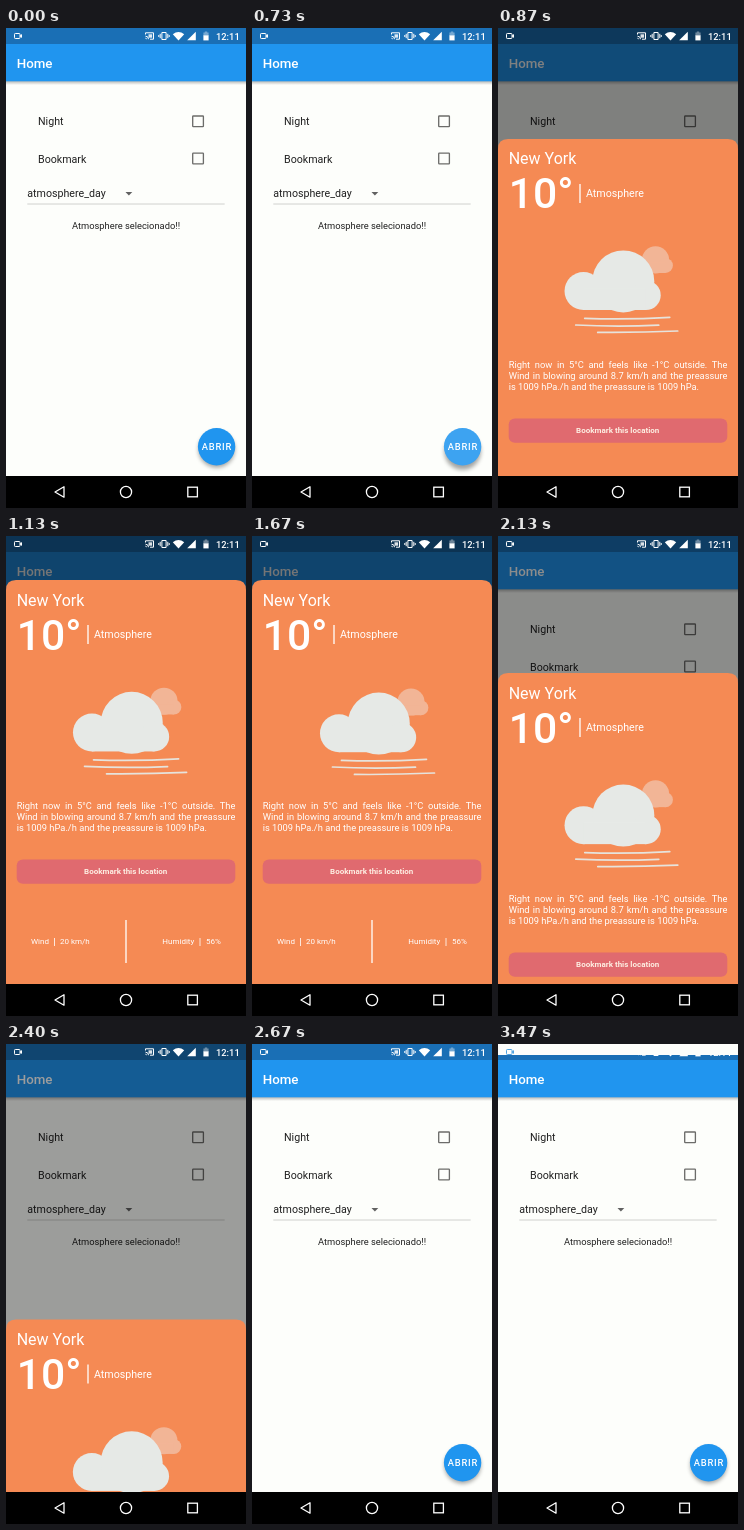
An HTML page that plays this animation: 240 px wide and 480 px high, repeating every 3540 ms.

```html
<!DOCTYPE html>
<html lang="en">
<head>
<meta charset="utf-8">
<title>Weather sheet</title>
<style>
  html, body { margin: 0; width: 100%; height: 100%; overflow: hidden; background: #fdfefb; }
  svg { display: block; width: 240px; height: 480px; font-family: Roboto, sans-serif; }
  .body { font-size: 10.67px; fill: #212121; }
  .small { font-size: 8px; }
  .line { fill: none; stroke: #fff; stroke-width: 1.3; }
  .box { fill: none; stroke: #6c6c6a; stroke-width: 1.33; }
  .wind { fill: none; stroke: #e6e3dc; stroke-width: 1.7; stroke-linecap: round; }
  .mid { text-anchor: middle; }
  p { margin: 0; font: 9.33px/10.94px Roboto, sans-serif; color: #fff; text-align: justify; }
</style>
</head>
<body>
<svg viewBox="0 0 240 480">
  <defs>
    <filter id="soft" x="-50%" y="-50%" width="200%" height="200%"><feGaussianBlur stdDeviation="2.2"/></filter>
    <linearGradient id="drop" x1="0" y1="0" x2="0" y2="1">
      <stop offset="0" stop-color="#000" stop-opacity=".28"/>
      <stop offset="1" stop-color="#000" stop-opacity="0"/>
    </linearGradient>
    <g id="cam">
      <rect x="8.5" y="5.5" width="5.5" height="5" rx=".8" fill="none" stroke="currentColor"/>
      <path d="M14 7.6L16 5.9V10.1L14 8.4Z" fill="currentColor"/>
    </g>
    <clipPath id="coverClip"><rect id="coverArea" width="240" height="0"/></clipPath>
  </defs>

  <rect width="240" height="480" fill="#fdfefb"/>
  <rect y="53" width="240" height="4" fill="url(#drop)"/>
  <rect y="16" width="240" height="37.3" fill="#2095ef"/>
  <rect width="240" height="16" fill="#1a6fb5"/>
  <text x="10.7" y="39.5" font-size="13.33" font-weight="500" fill="#fff">Home</text>

  <g class="body">
    <text x="32" y="97">Night</text>
    <text x="32" y="134.5">Bookmark</text>
    <text x="21.3" y="169">atmosphere_day</text>
    <text class="mid" x="120" y="200.7" font-size="9.33" style="font-size:9.33px">Atmosphere selecionado!!</text>
  </g>
  <rect class="box" x="186.7" y="88" width="10.7" height="10.7" rx=".6"/>
  <rect class="box" x="186.7" y="125.2" width="10.7" height="10.7" rx=".6"/>
  <path d="M119.5 164H126.3L122.9 167.4Z" fill="#616161"/>
  <path d="M21.3 176H218.7" stroke="#cbcbc9" stroke-width=".9"/>

  <ellipse id="shade" cx="210.6" cy="422" rx="18.2" ry="18.2" fill="#000" opacity=".35" filter="url(#soft)"/>
  <circle cx="210.6" cy="418.7" r="18.7" fill="#2095ef"/>
  <circle id="ripple" cx="210.6" cy="418.7" r="18.7" fill="#fff" opacity="0"/>
  <text class="mid" x="211" y="422.1" font-size="9.33" font-weight="500" letter-spacing=".8" fill="#fff">ABRIR</text>

  <rect id="scrim" width="240" height="448" opacity="0"/>

  <g id="status" fill="#fff" color="#fff">
    <use href="#cam"/>
    <path d="M139.5 6.5V4.8H147.5V11.2H144M139.5 8.2A3 3 0 0 1 142.5 11.2M139.5 10.2A1 1 0 0 1 140.5 11.2" fill="none" stroke="#fff"/>
    <rect x="142.5" y="6.3" width="3.6" height="3.4" opacity=".85"/>
    <path d="M155.9 4.5H160.1V11.5H155.9ZM154.2 5.8V10.2M161.8 5.8V10.2M152.8 7V9M163.2 7V9" fill="none" stroke="#fff"/>
    <path d="M166.8 6.2Q172.5 1.8 178.2 6.2L172.5 12.6Z"/>
    <path d="M181.2 12.3H189.8V3.7Z"/>
    <path d="M197.4 4.4H198.8V3.5H201.2V4.4H202.6V8H197.4Z" opacity=".4"/>
    <path d="M197.4 7.4H202.6V12.4H197.4Z"/>
    <text x="210" y="11.9" font-size="9.33" font-weight="500">12:11</text>
  </g>

  <g id="sheet" fill="#fff">
    <path d="M0 410V10Q0 0 10 0H230Q240 0 240 10V410Z" fill="#f58a54"/>
    <text x="10.7" y="25.6" font-size="16">New York</text>
    <text x="10.7" y="69.6" font-size="42.67" font-weight="500">10°</text>
    <path class="line" d="M82 45V64"/>
    <text x="88" y="58.2" font-size="10.67">Atmosphere</text>

    <g id="cloud">
      <g fill="#f2b596">
        <circle cx="158" cy="121" r="13.6"/>
        <circle cx="168" cy="126.8" r="7.4"/>
        <rect x="150" y="124" width="18" height="10.2"/>
      </g>
      <g fill="#e6e9e6">
        <circle cx="86" cy="152.2" r="19"/>
        <circle cx="125.8" cy="142.6" r="31"/>
        <circle cx="148.4" cy="156.4" r="14.8"/>
        <rect x="86" y="150" width="62.4" height="21.2"/>
      </g>
    </g>
    <g id="wind" class="wind">
      <path d="M87 179.6Q130 181 172 178.6"/>
      <path d="M78 186.2Q118 188.2 161 186.4"/>
      <path d="M100 193.6Q140 194 180 192.2"/>
    </g>

    <foreignObject x="10.67" y="221.4" width="218.8" height="40">
      <p>Right now in 5°C and feels like -1°C outside. The Wind in blowing around 8.7 km/h and the preassure is 1009 hPa./h and the preassure is 1009 hPa.</p>
    </foreignObject>

    <rect x="10.7" y="279.5" width="218.6" height="24.3" rx="6" fill="#e06a6f"/>
    <text class="small mid" x="119.7" y="294.4" font-weight="700" fill="#fdeee2">Bookmark this location</text>

    <path class="line" d="M120 340V383"/>
    <g class="small">
      <text x="25" y="364.4">Wind</text>
      <text x="54" y="364.4">20 km/h</text>
      <text x="156.3" y="364.4">Humidity</text>
      <text x="200" y="364.4">56%</text>
    </g>
    <path d="M48.5 358V366M194 358V366" stroke="#fff" stroke-width=".8"/>
  </g>

  <rect y="448" width="240" height="32"/>
  <g class="line">
    <path d="M49 464L58 458.8V469.2Z" stroke-linejoin="round"/>
    <circle cx="120" cy="464" r="5.6"/>
    <rect x="181.8" y="459.2" width="9.6" height="9.6"/>
  </g>

  <g clip-path="url(#coverClip)">
    <rect width="240" height="16" fill="#fdfefb"/>
    <use href="#cam" color="#4fa3e0"/>
  </g>
</svg>
<script>
  const LOOP = 3540, STEP = 1000 / 15, LAST = 52;
  const OPEN_Y = 44, SHUT_Y = 448;
  const $ = id => document.getElementById(id);
  const unit = (t, from, to) => Math.min(1, Math.max(0, (t - from) / (to - from)));

  const scrimKeys = [[735, 0], [867, .5], [960, .54], [1667, .54], [2133, .45], [2400, .385], [2533, 0]];
  const rippleKeys = [[580, 0], [733, .13], [867, .1], [1100, 0]];

  // Linear interpolation through [time, value] pairs
  function track(keys, t) {
    if (t <= keys[0][0]) return keys[0][1];
    for (let i = 1; i < keys.length; i++) {
      const [t0, v0] = keys[i - 1], [t1, v1] = keys[i];
      if (t <= t1) return v0 + (v1 - v0) * unit(t, t0, t1);
    }
    return keys[keys.length - 1][1];
  }

  function sheetY(t) {
    if (t < 1660) {
      const rest = 1 - unit(t, 735, 957);
      return OPEN_Y + (SHUT_Y - OPEN_Y) * rest * rest;
    }
    const dragEnd = 137;
    if (t < 2134) return OPEN_Y + (dragEnd - OPEN_Y) * Math.pow(unit(t, 1667, 2133), 1.3);
    return dragEnd + (SHUT_Y - dragEnd) * Math.pow(unit(t, 2133, 2533), 2);
  }

  const move = (id, x, y) => $(id).setAttribute("transform", `translate(${x.toFixed(2)} ${y.toFixed(2)})`);

  function render(ms) {
    const t = Math.min(LAST, Math.floor((ms % LOOP + 5) / STEP)) * STEP;
    const sway = Math.sin(2 * Math.PI * (t - 1225) / 1300);
    const press = track(rippleKeys, t);

    move("sheet", 0, sheetY(t));
    move("cloud", .3 + .8 * sway, .5 + .6 * sway);
    move("wind", 1.2 + 1.5 * sway, .4 + .5 * sway);
    $("scrim").setAttribute("opacity", track(scrimKeys, t));
    $("ripple").setAttribute("opacity", press);
    $("shade").setAttribute("cy", 421.5 + press * 16);
    $("coverArea").setAttribute("height", t > 3460 ? 11 : t > 3390 ? 5 : 0);
  }

  const start = performance.now();
  function tick() {
    render(performance.now() - start);
    requestAnimationFrame(tick);
  }
  tick();
</script>
</body>
</html>
```
